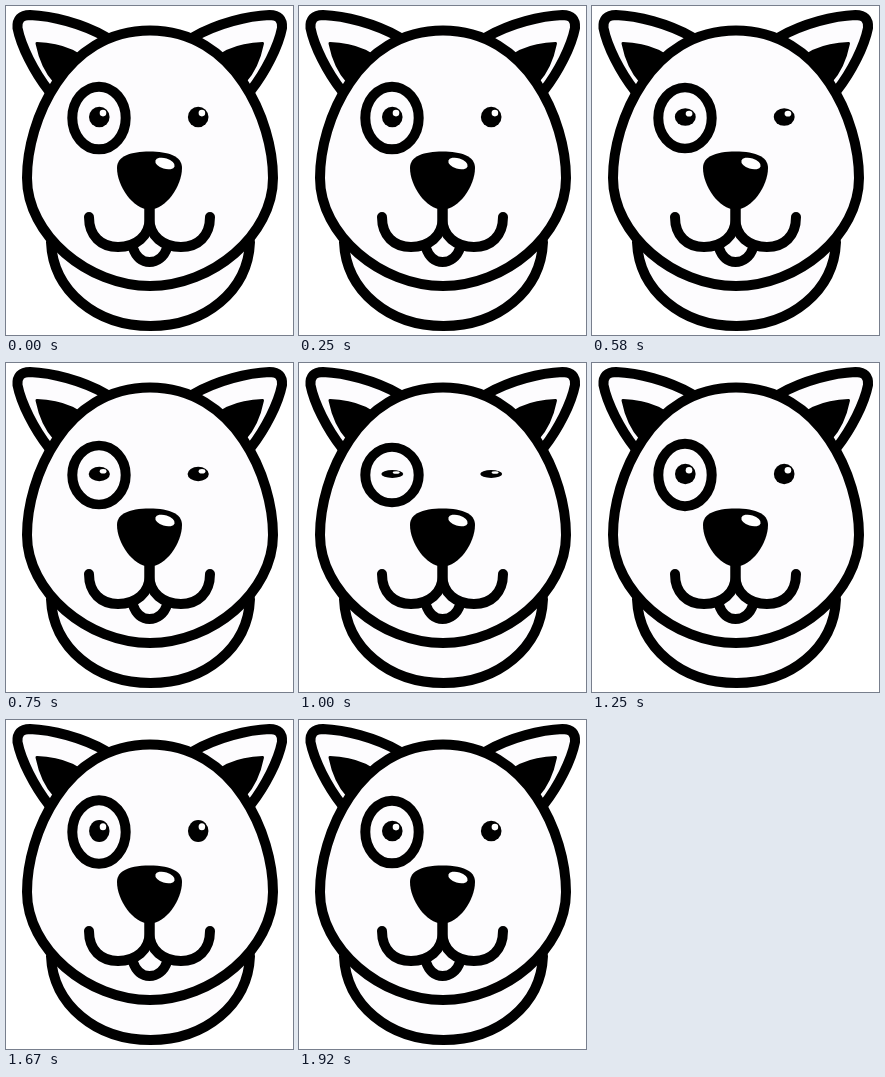
An HTML page for the animation above (2.66 s loop, 287 px wide and 329 px high).

```html
<!DOCTYPE html>
<html lang="en">
<head>
<meta charset="utf-8">
<title>Blinking dog</title>
<style>
  html, body { margin: 0; width: 100%; height: 100%; overflow: hidden; background: #fff; }
  svg { display: block; width: 100vw; height: 100vh; }
  .line { fill: #fdfcfe; stroke: #000; stroke-width: 10; stroke-linecap: round; stroke-linejoin: round; }
  .open { fill: none; }
  .shine { fill: #fff; }
</style>
</head>
<body>
<svg viewBox="0 0 287 329">
  <defs>
    <g id="ear">
      <path class="line" d="M43 85C28 66 15 40 11.500 22Q10.500 9 24 9C46 10 75 17 100 31"/>
      <path d="M31 37.500Q50 38 66 45L78 52L54 80L49 76Q36 62 31 37.500Z" stroke="#000" stroke-width="3" stroke-linejoin="round"/>
    </g>
    <g id="pupil">
      <circle r="10.300"/>
      <circle class="shine" cx="3.700" cy="-3.900" r="3.300"/>
    </g>
    <path id="smile" class="line open" d="M83 211C83 230 95 241 112 241C130 241 143.500 230 143.500 213V200"/>
  </defs>

  <path class="line" d="M45 236C47 285 90 320 144.500 320S242 285 244 236"/>
  <use href="#ear"/>
  <use href="#ear" transform="matrix(-1 0 0 1 287.500 0)"/>
  <path class="line" d="M144 24.500C59 24.500 21 115 21 172C21 229 82 280 144 280S267 229 267 172C267 115 229 24.500 144 24.500Z"/>

  <path class="line" d="M127 242C130 251 136 256 143.500 256S158 251 161 242"/>
  <use href="#smile"/>
  <use href="#smile" transform="matrix(-1 0 0 1 287 0)"/>

  <path d="M143.500 145.500C162 145.500 176 150 176 162C176 180 160 203.500 143.500 203.500S111 180 111 162C111 150 125 145.500 143.500 145.500Z"/>
  <ellipse class="shine" cx="159" cy="157.500" rx="10" ry="5.300" transform="rotate(17 159 157.500)"/>

  <ellipse id="ring" class="line" rx="26.700" ry="31.300"/>
  <use id="left" href="#pupil"/>
  <use id="right" href="#pupil"/>
</svg>
<script>
  const LOOP = 2660, STEP = 1000 / 12;
  const CLOSE = 4, SHUT = 12, REST = 23, MIN = 0.38;
  const el = id => document.getElementById(id);
  const lerp = (a, b, u) => a + (b - a) * u;

  // Ease out with an overshoot before coming to rest.
  const backOut = (u, c) => 1 + (c + 1) * (u - 1) ** 3 + c * (u - 1) ** 2;

  // Eye openness at a twelfth-of-a-second step.
  function openness(n) {
    if (n <= CLOSE || n >= REST) return 1;
    if (n <= SHUT) return lerp(1, MIN, ((n - CLOSE) / (SHUT - CLOSE)) ** 1.5);
    return lerp(MIN, 1, backOut((n - SHUT) / (REST - SHUT), 2.5));
  }

  function place(id, x, y, sx, sy) {
    el(id).setAttribute("transform", `translate(${x} ${y}) scale(${sx.toFixed(4)} ${sy.toFixed(4)})`);
  }

  function draw(now) {
    const n = Math.floor((now % LOOP + 4) / STEP);
    const s = openness(n);
    const wide = 1 + (1 - s) * 0.1;
    place("ring", 93, 112, 1, 1 - (1 - s) * 0.18);
    place("left", 93.3, 111, wide, s);
    place("right", 192.2, 111, wide, s);
    requestAnimationFrame(draw);
  }
  draw(0);
</script>
</body>
</html>
```
